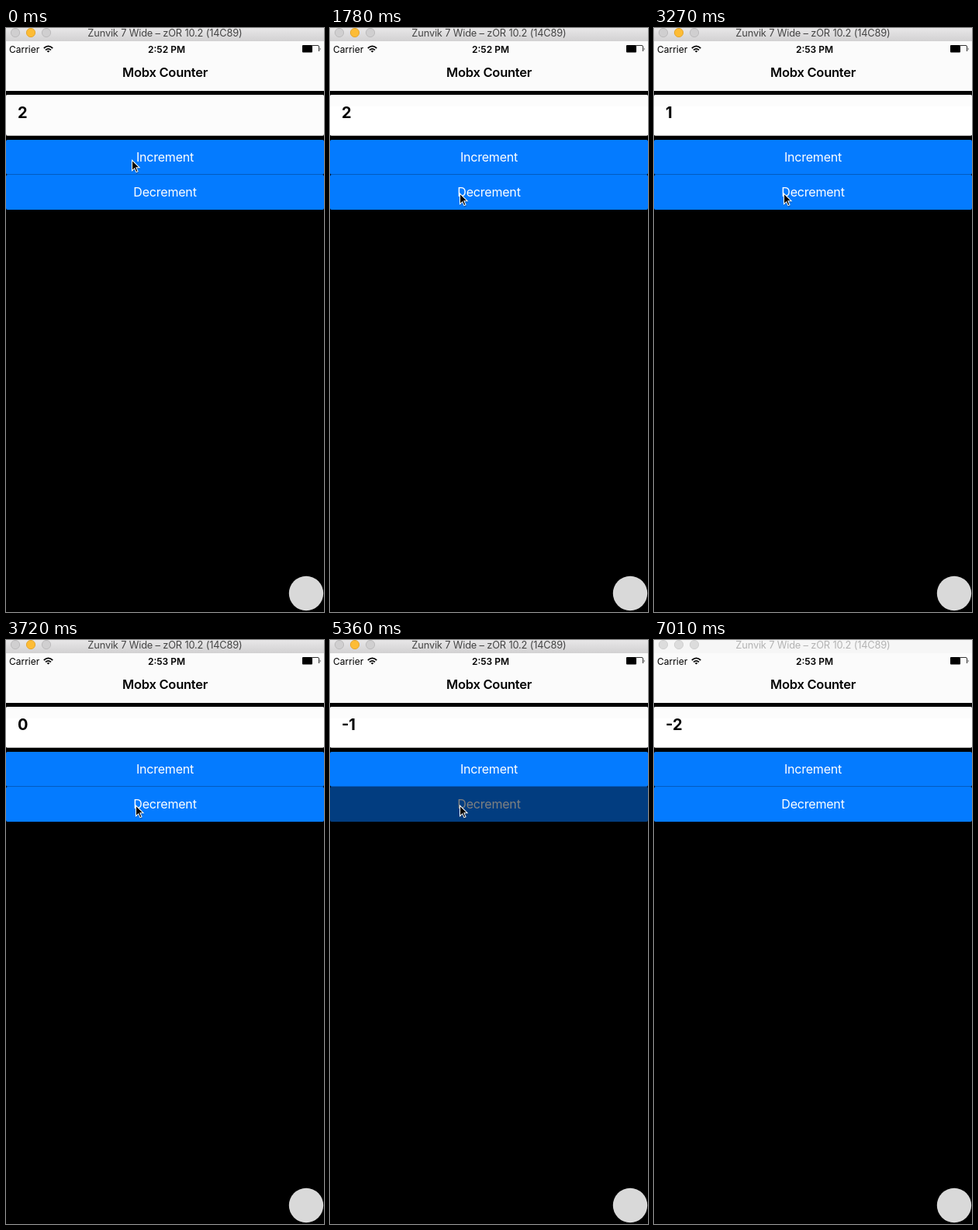
An HTML page for the animation above (7.11 s loop, 410x752 px).

```html
<!DOCTYPE html>
<html lang="en">
<head>
<meta charset="utf-8">
<title>Mobx Counter</title>
<style>
  html, body { margin: 0; width: 100%; height: 100%; overflow: hidden; background: #000; }
  svg { display: block; width: 410px; height: 752px; font-family: Inter, Roboto, sans-serif; }
  .mid { text-anchor: middle; }
  .button { fill: #047bff; }
  .label { fill: #fff; font-size: 16px; letter-spacing: -.2px; text-anchor: middle; }
</style>
</head>
<body>
<svg viewBox="0 0 410 752">
  <defs>
    <linearGradient id="chrome" x2="0" y2="1">
      <stop stop-color="#e8e7e8"/>
      <stop offset="1" stop-color="#d2d1d2"/>
    </linearGradient>
  </defs>
  <rect width="410" height="752"/>

  <rect id="bar" width="410" height="17"/>
  <g id="lights">
    <circle cx="12" cy="6" r="5.6"/>
    <circle cx="32" cy="6" r="5.6"/>
    <circle cx="52" cy="6" r="5.6"/>
  </g>
  <text id="title" class="mid" x="205" y="11" font-size="12.8" letter-spacing="-.15">Zunvik 7 Wide – zOR 10.2 (14C89)</text>

  <rect y="17" width="410" height="64" fill="#fbfbfb"/>
  <text x="4" y="32" font-size="12">Carrier</text>
  <g fill="none" stroke="#000" stroke-width="1.7">
    <path d="M48.8 26Q54.5 20.8 60.2 26M51 28.4Q54.5 25.2 58 28.4"/>
    <path d="M54.5 31.6L52.6 29.7Q54.5 28.2 56.4 29.7Z" fill="#000" stroke="none"/>
  </g>
  <text id="clock" class="mid" x="207" y="32" font-size="12" font-weight="600"></text>
  <rect x="382" y="22" width="13" height="9.5" rx="1"/>
  <path d="M395 22.5H402Q403.5 22.5 403.5 24V30" fill="none" stroke="#000" stroke-width=".8"/>
  <path d="M404.8 25.3Q406.5 27 404.8 28.7Z"/>
  <text class="mid" x="205" y="63" font-size="16.5" font-weight="600" letter-spacing="-.25">Mobx Counter</text>

  <rect y="86" width="410" height="53" rx="2" fill="#b5b5b5"/>
  <rect y="86" width="410" height="52" rx="2" fill="#fcfcfc"/>
  <rect id="paper" y="101" width="410" height="37" rx="1" fill="#fff"/>
  <text id="count" x="15" y="116" font-size="20" font-weight="700"></text>

  <g id="inc">
    <rect class="button" y="144" width="410" height="44.75" rx="2"/>
    <text class="label" x="205" y="172">Increment</text>
  </g>
  <g id="dec">
    <rect class="button" y="189" width="410" height="45" rx="2"/>
    <text class="label" x="205" y="217">Decrement</text>
  </g>

  <circle cx="387" cy="728" r="22.2" fill="#d9d9d9"/>
  <g id="cursor">
    <path d="M0 1V17L3.8 13.5L6 18.8L9 17.6L6.8 12.5H11.5Z" opacity=".25"/>
    <path d="M0 0V16L3.6 12.6L5.7 17.3L8.7 16.1L6.6 11.3H11.3Z" fill="#fff"/>
    <path d="M1 2.4V13.6L3.9 10.9L6.2 16L7.4 15.5L5.1 10.3H8.9Z"/>
  </g>
</svg>
<script>
const LOOP = 7110, HOLD = 150, FADE = 140;
const el = id => document.getElementById(id);
const set = (node, attrs) => {
  for (const name in attrs) node.setAttribute(name, attrs[name]);
};

// A tap changes the count at `at`; the button dims `lead` ms before that.
const tap = (at, step, lead = 0) => {
  const press = at - lead;
  return { at, step, press, release: Math.max(at, press) + FADE };
};
const taps = [
  tap(450, 1), tap(1780, -1, -HOLD), tap(2830, -1, HOLD),
  tap(3570, -1), tap(4470, -1, HOLD), tap(5510, -1, HOLD)
];

const countAt = t => taps.reduce((n, p) => n + (t >= p.at ? p.step : 0), 2);

// Half dark while held, lighter once the count has changed.
function opacityAt(t, step) {
  const p = taps.find(p => p.step === step && t >= p.press && t < p.release);
  return !p ? 1 : t < p.at ? .5 : .7;
}

// The pointer slides between the buttons in three held steps, then leaves.
function pointerAt(t) {
  if (t >= 5960) return null;
  if (t >= 5810) return [193, 255];
  const u = Math.min(3, Math.max(0, Math.floor((t - 740) / FADE) + 1)) / 3;
  const k = u ** 5 / (u ** 5 + (1 - u) ** 5);
  return [162 + 5 * k, 169 + 43 * k].map(Math.round);
}

function paintWindow(active) {
  set(el('bar'), { fill: active ? 'url(#chrome)' : '#f6f6f6' });
  set(el('title'), { fill: active ? '#444' : '#b3b3b3' });
  set(el('lights'), {
    fill: active ? '#d0cfd0' : '#dcdcdc',
    stroke: active ? '#bcbbbc' : '#d0d0d0'
  });
  set(el('lights').children[1], {
    fill: active ? '#fdbc35' : 'inherit',
    stroke: active ? '#e4a62f' : 'inherit'
  });
}

function render(t) {
  paintWindow(t < 7010);
  el('clock').textContent = t < 3270 ? '2:52 PM' : '2:53 PM';
  set(el('paper'), { visibility: t < taps[0].at ? 'hidden' : 'visible' });
  el('count').textContent = countAt(t);
  set(el('inc'), { opacity: opacityAt(t, 1) });
  set(el('dec'), { opacity: opacityAt(t, -1) });
  const tip = pointerAt(t);
  set(el('cursor'), { visibility: tip ? 'visible' : 'hidden' });
  if (tip) set(el('cursor'), { transform: `translate(${tip})` });
}

const start = performance.now();
function tick() {
  render((performance.now() - start) % LOOP);
  requestAnimationFrame(tick);
}
tick();
</script>
</body>
</html>
```
